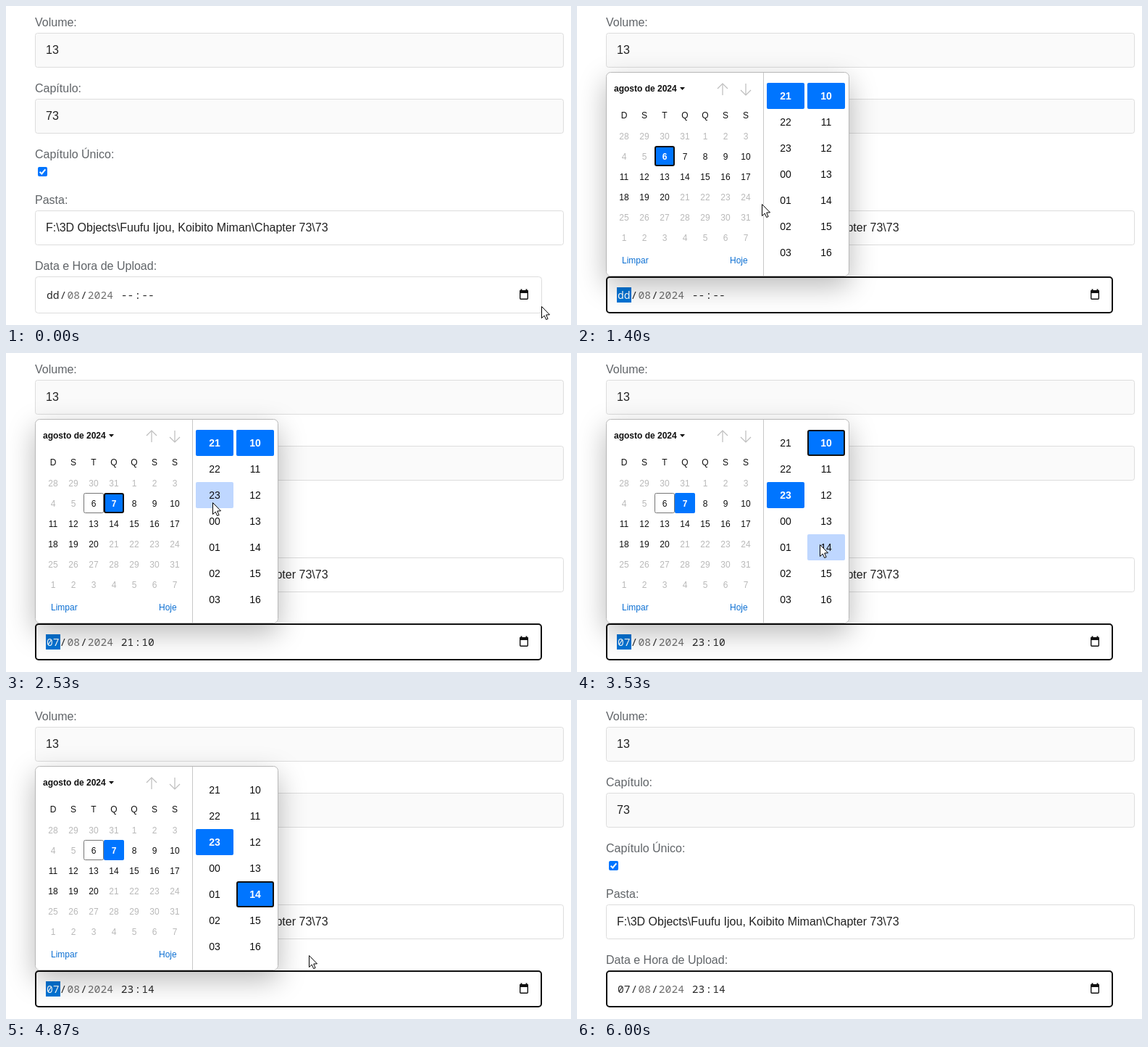
An HTML page with a canvas for the animation above (6.4 s loop, 780 by 440 pixels).

```html
<!DOCTYPE html>
<html lang="pt">
<head>
<meta charset="utf-8">
<title>Data e Hora de Upload</title>
<style>
html, body { margin: 0; width: 100%; height: 100%; overflow: hidden; background: #fff; }
canvas { display: block; width: 780px; height: 440px; }
</style>
</head>
<body>
<canvas id="stage" width="780" height="440"></canvas>
<script>
const ctx = document.getElementById('stage').getContext('2d');
const LOOP = 6400, TICK = 1000 / 15;
const SANS = '"Liberation Sans", Arial, sans-serif';
const MONO = '"Noto Sans Mono", monospace';
const BLUE = '#0075ff', HOVER = '#bfd7ff', LINK = '#0b6fd3', INK = '#101010';

// Moments of the interaction, in ticks
const FOCUS = 9, OPEN = 11, PICK_DAY = 33, PICK_HOUR = 41, SET_HOUR = 43,
      PICK_MIN = 54, SET_MIN = 56, CLOSE = 75, REFOCUS = 76, LEAVE = 87, BLUR = 90;

// Pointer path: tick, x, y
const PATH = [
  [0, 739, 414], [6, 716, 398], [14, 716, 398], [21, 255, 273], [24, 145, 240],
  [29, 146, 206], [33, 146, 206], [38, 285, 206], [43, 285, 206], [51, 335, 261],
  [52, 335, 261], [53, 335, 264], [56, 335, 264], [62, 157, 362], [64, 85, 353],
  [66, 85, 353], [74, 465, 352], [76, 465, 352], [80, 173, 396], [83, 173, 396],
  [86, 132, 419], [96, 132, 419]
];

function pointerAt(k) {
  const i = Math.max(1, PATH.findIndex(p => p[0] >= k));
  const [k0, x0, y0] = PATH[i - 1], [k1, x1, y1] = PATH[i];
  const u = (k - k0) / (k1 - k0);
  return { x: Math.round(x0 + (x1 - x0) * u), y: Math.round(y0 + (y1 - y0) * u) };
}

const inside = (p, x, y, w, h) => p.x >= x && p.x < x + w && p.y >= y && p.y < y + h;

function text(s, x, y, font, color, align = 'left') {
  ctx.font = font;
  ctx.fillStyle = color;
  ctx.textAlign = align;
  ctx.fillText(s, x, y);
}

function box(x, y, w, h, r, fill, stroke, line = 1) {
  const d = stroke ? line / 2 : 0;
  ctx.beginPath();
  ctx.roundRect(x + d, y + d, w - 2 * d, h - 2 * d, r);
  if (fill) { ctx.fillStyle = fill; ctx.fill(); }
  if (stroke) { ctx.strokeStyle = stroke; ctx.lineWidth = line; ctx.stroke(); }
}

function polyline(points, color, width) {
  ctx.beginPath();
  points.forEach(([x, y]) => ctx.lineTo(x, y));
  ctx.strokeStyle = color;
  ctx.lineWidth = width;
  ctx.stroke();
}

function form() {
  const label = (s, y) => text(s, 40, y, '16px ' + SANS, '#606468');
  const field = (s, y, fill) => {
    box(40, y, 730, 48, 3, fill, '#dddddd');
    text(s, 55, y + 29, '16px ' + SANS, '#212121');
  };
  label('Volume:', 28);
  field('13', 37, '#fafafa');
  label('Capítulo:', 119);
  field('73', 128, '#fafafa');
  label('Capítulo Único:', 210);
  box(44, 222, 13, 13, 2, BLUE);
  polyline([[46.6, 228.8], [49.3, 231.5], [54.3, 225.3]], '#fff', 2);
  label('Pasta:', 273);
  field('F:\\3D Objects\\Fuufu Ijou, Koibito Miman\\Chapter 73\\73', 282, '#fff');
  label('Data e Hora de Upload:', 364);
}

function dateField(k) {
  const focused = k >= FOCUS && (k < CLOSE || k >= REFOCUS);
  const marked = focused && k < BLUR;
  const chosen = k >= PICK_DAY;
  if (focused) box(40, 373, 700, 51, 4, '#fff', '#101010', 2);
  else box(40, 373, 700, 51, 4, '#fff', '#dddddd');
  if (marked) box(55, 388, 20, 21, 0, '#0074d6');

  const put = (s, x, color = '#2a2a2a') => text(s, x, 404, '14.67px ' + MONO, color);
  const hour = k >= SET_HOUR ? '23' : '21', minute = k >= SET_MIN ? '14' : '10';
  put(chosen ? '07' : 'dd', 56, marked ? '#fff' : undefined);
  put('/', 74.6);
  put('08', 84.4, '#707070');
  put('/', 103);
  put('2024', 112.8, '#707070');
  put(chosen ? hour : '--', 158.8);
  put(':', 177.4);
  put(chosen ? minute : '--', 187.2);

  box(709, 392, 12, 13, 1, null, '#101010', 1.4);
  box(709, 392, 12, 4, 1, '#101010');
  box(710.5, 390.5, 2, 2, 0, '#101010');
  box(717.5, 390.5, 2, 2, 0, '#101010');
}

function dayGrid(k, p) {
  const picked = k < PICK_DAY ? 6 : 7;
  [...'DSTQQSS'].forEach((s, i) => text(s, 65 + 28 * i, 155, '12px ' + SANS, INK, 'center'));
  for (let i = 0; i < 42; i++) {
    const d = i - 3, x = 51 + 28 * (i % 7), y = 165 + 28 * Math.floor(i / 7);
    const enabled = d >= 6 && d <= 20, on = d === picked;
    if (on) box(x, y, 28, 28, 2, BLUE, k < PICK_HOUR ? '#101010' : null, 2);
    else if (enabled && inside(p, x, y, 28, 28)) box(x, y, 28, 28, 2, HOVER);
    if (d === 6 && !on) box(x, y, 28, 28, 2, null, '#767676');
    const shown = d < 1 ? d + 31 : d > 31 ? d - 31 : d;
    text(shown, x + 14, y + 19, (on ? 'bold ' : '') + '12px ' + SANS,
      on ? '#fff' : enabled ? INK : '#b9b9b9', 'center');
  }
}

function timeColumn(x, first, mod, picked, ring, p) {
  for (let i = 0; i < 7; i++) {
    const y = 106 + 36 * i, on = i === picked;
    if (on) box(x, y, 52, 36, 2, BLUE, ring ? '#101010' : null, 2);
    else if (inside(p, x, y, 52, 36)) box(x, y, 52, 36, 2, HOVER);
    text(String((first + i) % mod).padStart(2, '0'), x + 26, y + 23,
      (on ? 'bold ' : '') + '14px ' + SANS, on ? '#fff' : INK, 'center');
  }
}

function popup(k, p) {
  ctx.save();
  ctx.shadowColor = 'rgba(0,0,0,0.28)';
  ctx.shadowBlur = 38;
  ctx.shadowOffsetY = 13;
  box(40, 91, 336, 282, 6, '#fff');
  ctx.restore();
  box(40, 91, 336, 282, 6, '#fff', '#b8b8b8');
  box(257, 92, 1, 280, 0, '#c8c8c8');

  text('agosto de 2024', 51, 118, 'bold 12px ' + SANS, INK);
  ctx.beginPath();
  ctx.moveTo(142, 112);
  ctx.lineTo(149, 112);
  ctx.lineTo(145.5, 116);
  ctx.fill();
  for (const [x, dir] of [[201, -1], [233, 1]]) {
    polyline([[x, 115 - 8 * dir], [x, 115 + 7.5 * dir]], '#bdbdbd', 1.2);
    polyline([[x - 7, 115 + dir], [x, 115 + 8 * dir], [x + 7, 115 + dir]], '#bdbdbd', 1.2);
  }

  dayGrid(k, p);
  if (inside(p, 61, 339, 39, 20)) box(61, 339, 39, 20, 0, HOVER, '#101010');
  text('Limpar', 62, 355, '12px ' + SANS, LINK);
  text('Hoje', 211, 355, '12px ' + SANS, LINK);

  timeColumn(262, 21, 24, k < PICK_HOUR ? 0 : 2, k >= PICK_HOUR && k < SET_HOUR, p);
  timeColumn(318, 10, 60, k < PICK_MIN ? 0 : 4, k >= SET_HOUR, p);
}

function pointer({ x, y }) {
  ctx.save();
  ctx.translate(x + 0.5, y + 0.5);
  ctx.beginPath();
  [[0, 0], [0, 16], [3.7, 12.6], [6.2, 18], [8.6, 17], [6.2, 11.5], [11, 11.3]]
    .forEach(([a, b]) => ctx.lineTo(a, b));
  ctx.closePath();
  ctx.fillStyle = '#fff';
  ctx.fill();
  ctx.strokeStyle = '#000';
  ctx.lineWidth = 1;
  ctx.stroke();
  ctx.restore();
}

function draw(now) {
  // The screen refreshes 15 times a second
  const k = Math.floor((now % LOOP + 4) / TICK) % 96;
  const p = pointerAt(k);
  ctx.fillStyle = '#fff';
  ctx.fillRect(0, 0, 780, 440);
  form();
  dateField(k);
  if (k >= OPEN && k < CLOSE) popup(k, p);
  if (k < LEAVE) pointer(p);
}

const start = performance.now();
function loop() {
  draw(performance.now() - start);
  requestAnimationFrame(loop);
}
loop();
</script>
</body>
</html>
```
